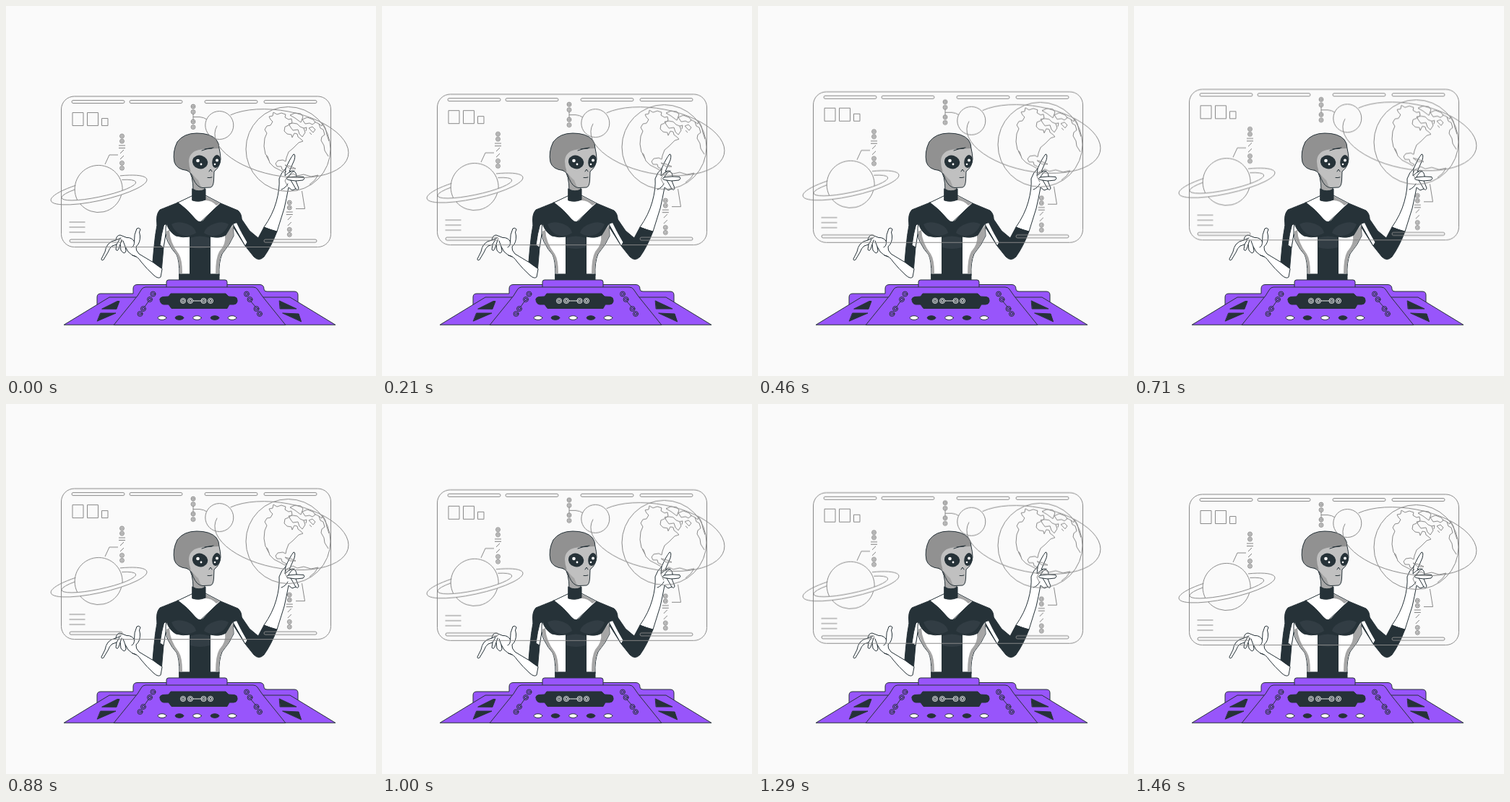
Animation, 512 px wide and 512 px high, one loop 1500 ms. Source, as an HTML page:

```html
<!DOCTYPE html>
<html lang="en">
<head>
<meta charset="utf-8">
<title>Alien at the star map</title>
<style>
  html, body { margin: 0; width: 100%; height: 100%; overflow: hidden; background: #fafafa; }
  svg { display: block; width: 100vw; height: 100vh; }
  .ink { stroke: #263238; stroke-width: 1; stroke-linejoin: round; stroke-linecap: round; }
  .dark { fill: #263238; }
  .soft { fill: #323d44; }
  .white { fill: #fff; }
  .shade { fill: #a6a6a6; }
  .purple { fill: #9855fb; }
  .line { fill: none; }
  .holo { fill: none; stroke: #888; stroke-width: 1; stroke-linejoin: round; animation: hover 1.5s -20ms linear infinite; }
  .dots { stroke: #555; stroke-width: .75; }
  @keyframes hover {
    0%, 100% { transform: translateY(.3px); }
    50% { transform: translateY(-9.94px); }
  }
</style>
</head>
<body>
<svg viewBox="0 0 512 512">
  <defs>
    <g id="dot"><circle r="2.9"/><circle r="1.3"/></g>
    <g id="knob"><circle r="3.5"/><circle r="1.7"/></g>
    <rect id="bar" width="73" height="4" rx="2"/>
    <g id="chain">
      <use href="#dot"/><use href="#dot" y="7"/>
      <path d="M-4.5 13H4.5M-4.5 16.5H4.5M-2.5 24L2.5 19M-2.5 32L2.5 27"/>
      <use href="#dot" y="37.3"/><use href="#dot" y="44.3"/>
    </g>
    <path id="head" d="M250 227.500Q236 226 233 216Q230 202 237 188Q246 176 264 176Q283 176 291 185Q295 190 295 197Q297 205 297 212Q296 223 288 229L287.500 241Q287 250 283 251L272 251.500Q264 251 259 239Q257 230 250 227.500Z"/>
  </defs>

  <!-- left arm -->
  <g class="ink">
    <path class="white" d="M204 355L184 343Q179 338 180 333Q186 328 185.500 318L184.500 313 186 309Q184 306 181 308Q177 316 177.500 326Q174 320 167 320.500L158 317Q153 317 152 324Q145 325 141 330Q138 334 137 340L132 350Q132 353 135 351L141 341Q143 335 147 332L153 330 152 337Q154 340 156 336L158 330 159 338Q164 345 166 339L165 333Q168 341 175 345Q182 346 187 354Q195 364 205 373Q211 378 214 375L216 364Z"/>
    <path class="line" d="M152 324L159 321M153 330L157 323M158 330L160 324M165 333L162 325M177.500 326Q178 332 174 334M175 345L180 347"/>
    <path class="dark" d="M210 297Q206 318 204.500 337L203 354Q209 359 215.500 363L218 334 222 302Z"/>
    <path class="white" d="M219 301Q215 315 213 331L218 334 223 304Z"/>
  </g>

  <!-- right arm and pointing hand -->
  <g class="ink">
    <path class="white" d="M357 306Q369 289 374 271Q379 253 378 239Q381 230 387 225Q393 211 398 205Q401 205 399 213L392 229 397 228Q402 230 402 236L412 236.500Q414 239 411 241L401 242 405 252Q404 256 401 253L396 255 391 251Q388 267 385 280L375 312Z"/>
    <path class="line" d="M387 225L386 235Q391 230 394 229M402 236L390 237Q386 240 393 241L401 242M394 241L401 253M399 228Q393 231 391 237M381 254Q387 252 390 246"/>
    <path class="dark" d="M324 292L337 311 349 321 357 306Q366 310 375 312Q367 333 357 347Q350 354 343 347L331 332 312 302Z"/>
    <path class="white" d="M314 302L331 332 334 327Q325 312 319 299Z"/>
  </g>

  <!-- torso -->
  <g class="ink">
    <path class="white" d="M222 300Q219 316 224 326Q230 338 236 344Q240 352 240 373H295Q294 355 299 343Q310 330 315 318L314 299 268 276Z"/>
    <path class="white" d="M238 272L259 262H276L297 273 268 300Z"/>
  </g>
  <path class="shade" d="M221.500 312Q222 325 236 344Q240 352 240.500 370H244Q244 351 239 343Q227 328 226 310Z"/>
  <path class="shade" d="M314.500 303L314.500 318Q309 331 298.500 343Q294 356 294.500 370H290Q290 349 295 340Q305 329 303 317Z"/>
  <path class="shade" d="M276 263L296 273 291 276Q284 268 274 269Z"/>
  <path class="ink dark" d="M238 272Q223 278 213 282Q207 288 209 303L217 304 222 301Q226 313 235 318Q245 321 254.500 319V372H282.500V319Q296 322 304 317L314 301 326 298Q327 288 321 283L297 273Q283 285 273 297Q268 301 263 296Q251 281 238 272Z"/>
  <path class="soft" d="M229 302Q237 297 249 301Q261 305 263 314Q253 321 241 316Q233 312 229 302ZM308 302Q300 297 289 301Q276 305 274 314Q284 321 296 316Q304 312 308 302ZM255 321Q268 316 282 321V334Q268 338 255 334Z"/>
  <path class="ink dark" d="M240 371H295V382H240Z"/>

  <!-- neck and head -->
  <g class="ink">
    <path class="shade" d="M252 226Q259 234 259 256H275V248Z"/>
    <path class="dark" d="M258 253Q267 259 276 253V268Q267 272 258 269Z"/>
  </g>
  <use href="#head" fill="#c0c0c0"/>
  <path fill="#919191" d="M250 227.500Q236 226 233 216Q230 202 237 188Q246 176 264 176Q283 176 291 185Q295 190 295 197L284 197.500Q270 197 261 201Q253 206 253 215Q253 222 256 230Z"/>
  <path fill="#a3a3a3" d="M256 230Q262 238 266 241L270 251Q264 250 259 239Z"/>
  <use href="#head" class="ink line"/>
  <path class="ink line" d="M271 200Q278 197 285 197M275 198L287 196M281 229L283 226 285 229M279 237.500Q282 238 285 237"/>
  <ellipse class="dark" cx="268.500" cy="216" rx="10.800" ry="9.300" transform="rotate(18 268.500 216)"/>
  <ellipse class="dark" cx="291" cy="215" rx="5.600" ry="9" transform="rotate(12 291 215)"/>
  <g class="white">
    <circle cx="265.500" cy="214" r="2.300"/><circle cx="270" cy="219" r="1.400"/>
    <circle cx="292" cy="213.500" r="2"/><circle cx="289" cy="219" r="1.300"/>
  </g>

  <!-- console -->
  <g class="ink purple">
    <path d="M126 414V403Q126 398 131 398H176V391Q176 385.500 182 385.500H351Q357 385.500 357 392Q357 395 361 395H399Q404 395 404 400V411Z"/>
    <path d="M222 390V382Q222 379 225 379H303Q306 379 306 382V390Z"/>
    <path d="M80.500 441L143 403H393L455.500 441Z"/>
    <path d="M149.500 441L182 401 187 393Q189 389 193 389H342Q346 389 348 392L355 402 386.500 441Z"/>
  </g>
  <path class="ink dark" d="M133 419L154 408.500H157L153 419ZM131 425H152L126.500 436ZM378.500 408L402 419H379.500ZM383 425L405 426 408.500 436.500Z"/>
  <path class="ink dark" d="M213 406Q213 403 217 402.500L225 402 228 398H304L308 402 316 402.500Q320 403 320 407V409Q319 413 315 413H309L306 418.500H229L225 413H218Q213 412 213 406Z"/>
  <g fill="none" stroke="#fff" stroke-width=".9">
    <use href="#knob" x="245" y="408"/><use href="#knob" x="255" y="408"/>
    <path d="M258.500 408H270"/>
    <use href="#knob" x="273.500" y="408"/><use href="#knob" x="283" y="408"/>
  </g>
  <g class="ink line">
    <use href="#knob" x="203.500" y="398.500"/><use href="#knob" x="199" y="406"/>
    <path d="M197 409L192 416M339 409L345 416"/>
    <use href="#knob" x="190" y="419"/><use href="#knob" x="185.500" y="426"/>
    <use href="#knob" x="333" y="398.500"/><use href="#knob" x="337.500" y="406"/>
    <use href="#knob" x="346.500" y="419"/><use href="#knob" x="351" y="426"/>
  </g>
  <g class="ink">
    <ellipse class="white" cx="216" cy="431.500" rx="5.800" ry="2.800"/>
    <ellipse class="dark" cx="240" cy="431.500" rx="5.800" ry="2.800"/>
    <ellipse class="white" cx="264.500" cy="431.500" rx="5.800" ry="2.800"/>
    <ellipse class="dark" cx="289" cy="431.500" rx="5.800" ry="2.800"/>
    <ellipse class="white" cx="313" cy="431.500" rx="5.800" ry="2.800"/>
  </g>

  <!-- floating display -->
  <g class="holo">
    <rect x="76.500" y="125" width="373" height="208.500" rx="18"/>
    <use href="#bar" x="91" y="130.500"/><use href="#bar" x="171" y="130.500"/>
    <use href="#bar" x="275" y="130.500"/><use href="#bar" x="357" y="130.500"/>
    <use href="#bar" x="88" y="323"/><use href="#bar" x="357" y="323"/>
    <path d="M92 147.500H107V165.500H92ZM112.500 147.500H127.500V165.500H112.500ZM132.500 155.500H141V165.500H132.500Z"/>
    <path d="M87.500 299H109.500M87.500 306H109.500M87.500 313H109.500"/>
    <path d="M155 206H143L137 219M401 280.500H413.500L409.500 256M259 149V157M259 153.500H268Q274 154 278 157"/>
    <g class="dots">
      <use href="#chain" x="160.500" y="180"/><use href="#chain" x="392.300" y="272"/>
      <use href="#dot" x="259" y="139"/><use href="#dot" x="259" y="146.500"/>
      <use href="#dot" x="259" y="160"/><use href="#dot" x="259" y="167.500"/>
    </g>

    <!-- ringed planet -->
    <path d="M98.800 268.500A33 33 0 1 1 161.100 255.200M102.500 273.700A33 33 0 0 0 159.700 261.100"/>
    <path d="M96.400 248.200A68 14.600 -12.500 1 0 157.900 234.900M95.600 253.800A52.500 9.500 -12 1 0 160.300 240.400"/>

    <!-- globe with moon -->
    <circle cx="295.300" cy="165" r="19.500"/>
    <path d="M292.100 165.700A93.700 45.100 10.400 1 0 310.600 150.800"/>
    <circle cx="390.500" cy="198" r="58.500"/>
    <path d="M366 157L364 153 369 152 370 147 375 150 381 148 387 150 386 154 391 157 395 156 396 161 391 165 386 167 385 173 389 177 395 178 396 182 399 176 403 177 404 181 408 184 411 187 405 189 400 194 397 197 391 202 388 210 387 215 383 213 376 214 373 218 375 222 381 222 382 226 388 229 386 231 379 227 371 223 365 217 362 208 359 205 357 194 358 183 361 176 358 171 361 166 366 165 369 160Z"/>
    <path d="M360 207L364 214M386 220L394 222 401 225 393 225ZM391 163L397 162 403 163 407 167 412 169 414 175 410 181 406 177 404 171 397 172 394 168ZM393 151L400 148 408 149 411 153 408 161 404 158 400 155Z"/>
    <path d="M410 157L417 154 425 157 428 161 424 164 420 162 414 163ZM419 169L424 167 428 171 425 175ZM427 160L433 163 435 169 439 171 441 178 437 181 436 186 440 193 441 200 446 208M412 169L416 168 415 173M420 175L423 178M433 163L437 166 438 162 442 169 444 178 447 187"/>
    <path d="M389 236L397 232 403 235 412 233 422 236 432 234Q428 242 420 247M389 236L386 242 390 250"/>
  </g>
</svg>
</body>
</html>
```
